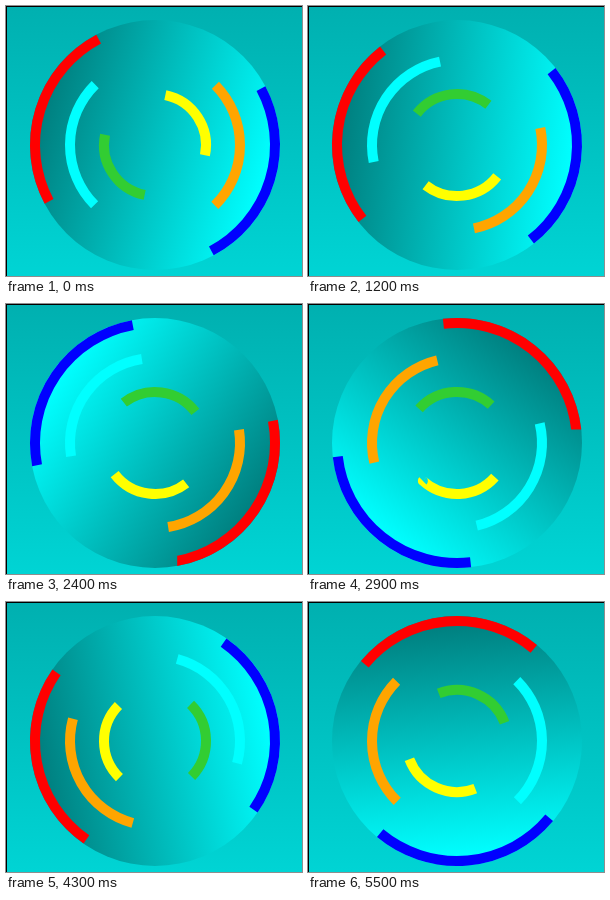
Animation, 296 px wide and 270 px high, one loop 5.6 s. Source, as an HTML page with a canvas:

```html
<!DOCTYPE html>
<html lang="en">
<head>
<meta charset="utf-8">
<title>Spinning rings</title>
<style>
  html, body { margin: 0; width: 100%; height: 100%; overflow: hidden; }
  canvas { display: block; }
</style>
</head>
<body>
<canvas id="stage" width="296" height="270"></canvas>
<script>
const ctx = document.getElementById('stage').getContext('2d');
const WIDTH = 296, HEIGHT = 270;
const LOOP = 5600, STEP = 100;
const CENTER = { x: 149, y: 139 };
const DISC_RADIUS = 125, STROKE = 10;

// Accumulated ring angles in degrees at the given times (ms)
const times = [0, 1200, 2000, 2900, 3700, 4900, 5500];
const rings = [
  { radius: 120, colors: ['red', 'blue'],
    angles: [197, 547, 895, 1388.5, 1773.7, 2166, 2424.8] },
  { radius: 85, colors: ['aqua', 'orange'],
    angles: [180.3, 573.5, 795.7, 1111.6, 1577.7, 1962.6, 2159.7] },
  { radius: 51, colors: ['limegreen', 'yellow'],
    angles: [146.7, 623, 1077.6, 1707, 2220.6, 2817.8, 3174] }
];

const radians = degrees => degrees * Math.PI / 180;

function angleAt(angles, time) {
  let i = 0;
  while (i < times.length - 2 && time >= times[i + 1]) i++;
  const part = (time - times[i]) / (times[i + 1] - times[i]);
  return radians(angles[i] + (angles[i + 1] - angles[i]) * part);
}

function linearGradient(x0, y0, x1, y1, from, to) {
  const gradient = ctx.createLinearGradient(x0, y0, x1, y1);
  gradient.addColorStop(0, from);
  gradient.addColorStop(1, to);
  return gradient;
}

function drawBackdrop() {
  ctx.fillStyle = linearGradient(0, 0, 0, HEIGHT, 'rgb(0,176,176)', 'rgb(0,212,212)');
  ctx.fillRect(0, 0, WIDTH, HEIGHT);
  ctx.fillStyle = 'black';
  ctx.fillRect(0, 0, WIDTH, 1);
  ctx.fillRect(0, 0, 1, HEIGHT);
}

// The dark side of the disc follows the first arc of the outer ring
function drawDisc(angle) {
  const reach = DISC_RADIUS - STROKE;
  const dx = Math.cos(angle) * reach, dy = Math.sin(angle) * reach;
  ctx.fillStyle = linearGradient(dx, dy, -dx, -dy, 'teal', 'aqua');
  ctx.beginPath();
  ctx.arc(0, 0, DISC_RADIUS, 0, 2 * Math.PI);
  ctx.fill();
}

function drawRing({ radius, colors }, angle) {
  ctx.lineWidth = STROKE;
  colors.forEach((color, i) => {
    const middle = angle + i * Math.PI;
    ctx.strokeStyle = color;
    ctx.beginPath();
    ctx.arc(0, 0, radius, middle - Math.PI / 4, middle + Math.PI / 4);
    ctx.stroke();
  });
}

function draw(time) {
  drawBackdrop();
  ctx.save();
  ctx.translate(CENTER.x, CENTER.y);
  drawDisc(angleAt(rings[0].angles, time));
  for (const ring of rings) drawRing(ring, angleAt(ring.angles, time));
  ctx.restore();
}

const start = performance.now();
function tick() {
  const elapsed = (performance.now() - start) % LOOP;
  draw(Math.floor(elapsed / STEP) * STEP);
  requestAnimationFrame(tick);
}
tick();
</script>
</body>
</html>
```
